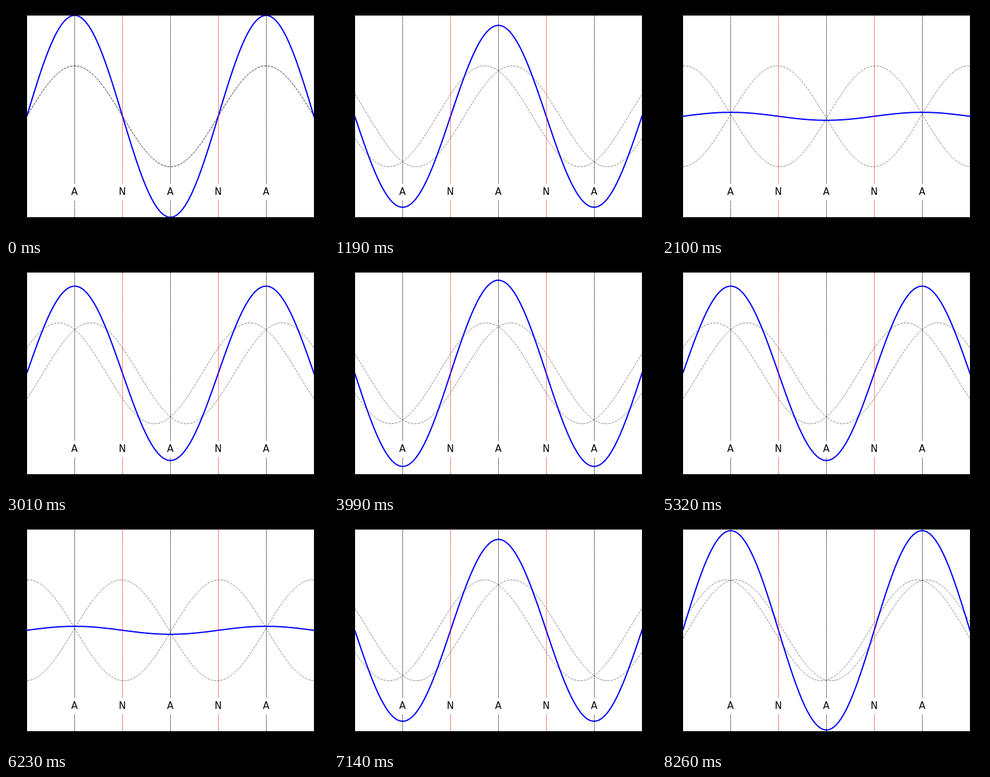
These frames come from a looping animation (504 by 360 pixels, 8330 ms). An HTML page with a canvas:

```html
<!DOCTYPE html>
<html>
<head>
<meta charset="utf-8">
<title>Standing wave</title>
<style>
html, body { margin: 0; width: 100%; height: 100%; overflow: hidden; background: #000; }
canvas { display: block; }
</style>
</head>
<body>
<canvas id="stage" width="504" height="360"></canvas>
<script>
const ctx = document.getElementById('stage').getContext('2d');
const STEP = 70, STEPS = 119, CYCLES = 3;
const LEFT = 32.6, RIGHT = 482, MID = 173.4, AMP = 158.6;
const K = 3 * Math.PI / (RIGHT - LEFT);
const marks = [107, 182, 257, 332, 407];

function stroke(color, width, dash, trace) {
  ctx.strokeStyle = color;
  ctx.lineWidth = width;
  ctx.setLineDash(dash);
  ctx.beginPath();
  trace();
  ctx.stroke();
}

function wave(amp, phase) {
  for (let x = LEFT; x <= RIGHT + 1; x++) {
    ctx.lineTo(x, MID - amp * Math.sin(K * (x - LEFT) + phase));
  }
}

function draw(step) {
  const phase = 2 * Math.PI * CYCLES * step / STEPS;
  ctx.fillStyle = '#000';
  ctx.fillRect(0, 0, 504, 360);
  ctx.save();
  ctx.beginPath();
  ctx.rect(33, 15, 449, 317);
  ctx.clip();
  ctx.fillStyle = '#fff';
  ctx.fillRect(33, 15, 449, 317);

  // Two travelling waves and their sum
  for (const p of [phase, -phase]) {
    stroke('rgba(0,0,0,.5)', 1, [3.7, 1.6], () => wave(AMP / 2, p));
  }
  stroke('#00f', 2, [], () => wave(AMP * Math.cos(phase), 0));

  // Antinodes and nodes
  ctx.font = '15px "DejaVu Sans", sans-serif';
  ctx.textAlign = 'center';
  marks.forEach((x, i) => {
    const node = i % 2;
    stroke(node ? '#f00' : '#000', 0.75, [1.85, 0.8], () => {
      ctx.moveTo(x + 0.5, 332);
      ctx.lineTo(x + 0.5, 15);
    });
    ctx.fillStyle = '#fff';
    ctx.fillRect(x - 10, 279.5, 20.5, 26);
    ctx.fillStyle = '#000';
    ctx.fillText(node ? 'N' : 'A', x + 0.2, 297);
  });
  ctx.restore();
}

const start = performance.now();
function tick() {
  draw(Math.floor((performance.now() - start) / STEP) % STEPS);
  requestAnimationFrame(tick);
}
tick();
</script>
</body>
</html>
```
